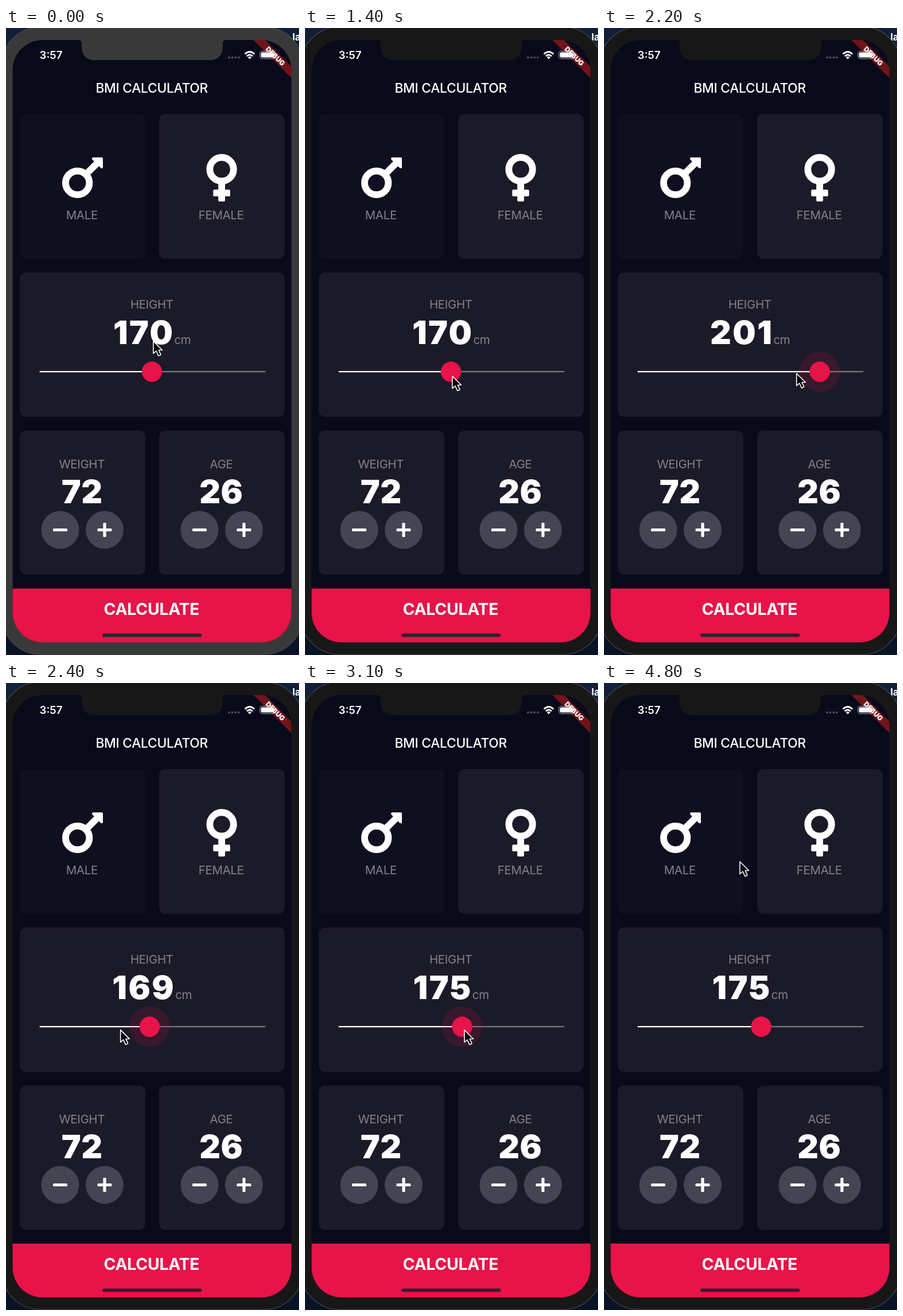
An HTML page that plays this animation: 511x1095 px, repeating every 5000 ms.

```html
<!DOCTYPE html>
<html lang="en">
<head>
<meta charset="utf-8">
<title>BMI Calculator</title>
<style>
  html, body { margin: 0; width: 100%; height: 100%; overflow: hidden; background: #0c172b; }
  svg { display: block; width: 100%; height: 100%; font-family: Inter, Roboto, sans-serif; }
  text { fill: #fff; text-anchor: middle; }
  .label { font-size: 20.5px; letter-spacing: -.35px; fill: #82828d; }
  .number { font-size: 57px; font-weight: 900; letter-spacing: .6px; }
  #height { letter-spacing: 2.4px; }
  .card { fill: #1b1a28; }
  .card.off { fill: #0f0f20; }
  .bezel { fill: #181717; }
  .blurred .bezel { fill: #3a393a; }
  .round { fill: #444553; }
  .red { fill: #e81349; }
  .icon { fill: #fff; }
  .icon circle { fill: none; stroke: #fff; stroke-width: 64; }
</style>
</head>
<body>
<svg id="stage" viewBox="0 0 511 1095" preserveAspectRatio="none">
  <defs>
    <clipPath id="screen"><rect x="11.6" y="21" width="486.2" height="1052" rx="52"/></clipPath>
    <linearGradient id="desk" x2="0" y2="1">
      <stop stop-color="#111f38"/><stop offset="1" stop-color="#091326"/>
    </linearGradient>
    <g id="minus">
      <circle class="round" r="33"/>
      <rect x="-12.5" y="-2.6" width="25" height="5.2" rx="1.6" fill="#fff"/>
    </g>
    <g id="plus">
      <use href="#minus"/>
      <rect x="-2.6" y="-12.5" width="5.2" height="25" rx="1.6" fill="#fff"/>
    </g>
  </defs>

  <rect width="511" height="1095" fill="url(#desk)"/>
  <text x="499.5" y="21.5" font-size="17" font-weight="700" style="text-anchor:start">la</text>
  <rect class="bezel" x="-8" y="-2" width="526" height="1096" rx="68" stroke="#47494e" stroke-width="1.2"/>

  <g clip-path="url(#screen)">
    <rect x="11" y="21" width="488" height="1052" fill="#080a1a"/>
    <text x="254.2" y="113.3" font-size="22.8" font-weight="500" letter-spacing="-.3">BMI CALCULATOR</text>

    <rect id="male" class="card" x="24" y="150" width="219" height="253" rx="11.5"/>
    <rect id="female" class="card" x="267" y="150" width="219" height="253" rx="11.5"/>
    <rect class="card" x="24" y="427" width="462" height="252" rx="11.5"/>
    <rect class="card" x="24" y="703" width="219" height="252" rx="11.5"/>
    <rect class="card" x="267" y="703" width="219" height="252" rx="11.5"/>

    <g class="icon" transform="translate(98 214.2) scale(.185)">
      <circle cx="144" cy="304" r="112"/>
      <path d="M372 64h-79c-10.7 0-16 12.9-8.5 20.4l16.9 16.9-91 91 45.2 45.3 91-91 16.9 16.9c7.6 7.6 20.4 2.2 20.4-8.5V76q0-12-12-12z"/>
    </g>
    <g class="icon" transform="translate(349.5 214.2) scale(.185)">
      <circle cx="144" cy="176" r="112"/>
      <path d="M112 300v68H76q-12 0-12 12v40q0 12 12 12h36v36q0 12 12 12h40q12 0 12-12v-36h36q12 0 12-12v-40q0-12-12-12h-36v-68z"/>
    </g>
    <text class="label" x="132.3" y="334">MALE</text>
    <text class="label" x="375.3" y="334">FEMALE</text>

    <text class="label" x="254.3" y="490">HEIGHT</text>
    <text x="254.7" y="551.7"><tspan id="height" class="number">170</tspan><tspan class="label">cm</tspan></text>
    <rect x="58.5" y="598.9" width="394" height="2.4" rx="1.2" fill="#777781"/>
    <rect id="filled" x="58.5" y="598.9" width="196" height="2.4" rx="1.2" fill="#fff"/>
    <g id="thumb">
      <circle id="halo" class="red" r="35.2"/>
      <circle class="red" r="17.7"/>
    </g>

    <text class="label" x="132.3" y="769">WEIGHT</text>
    <text class="number" x="132.7" y="830">72</text>
    <use href="#minus" x="94.5" y="876.5"/>
    <use href="#plus" x="172" y="876.5"/>
    <text class="label" x="375.6" y="769">AGE</text>
    <text class="number" x="375.4" y="830">26</text>
    <use href="#minus" x="337.5" y="876.5"/>
    <use href="#plus" x="415" y="876.5"/>

    <rect class="red" x="11" y="979" width="488" height="94"/>
    <text x="253.8" y="1025" font-size="28.4" font-weight="700" letter-spacing="-.3">CALCULATE</text>
    <rect x="168" y="1057.4" width="173.5" height="6" rx="3" fill="#33202c"/>

    <g transform="translate(498 21) rotate(45)">
      <rect x="-47" y="32.9" width="94" height="14.1" fill="#b71c1c" fill-opacity=".6"/>
      <text y="44.2" font-size="12" font-weight="900">DEBUG</text>
    </g>

    <text x="78.5" y="54" font-size="18.6" font-weight="600">3:57</text>
    <path d="M389 51.5h18" fill="none" stroke="#4b4d57" stroke-width="4" stroke-linecap="round" stroke-dasharray="0 5.7"/>
    <g fill="none" stroke="#fff" stroke-width="2.7">
      <path d="M416.7 45.6Q425 37.4 433.3 45.6"/>
      <path d="M420 49.2Q425 44.2 430 49.2"/>
    </g>
    <path d="M421.8 51.2Q425 48.2 428.2 51.2L425 54.4Z" fill="#fff"/>
    <rect x="442.6" y="40.6" width="27" height="13" rx="4" fill="none" stroke="#fff" stroke-opacity=".5" stroke-width="1.2"/>
    <rect x="444.6" y="42.6" width="23" height="9" rx="2.3" fill="#fff"/>
    <path d="M471 45v4.5q2-2.2 0-4.5" fill="#fff" fill-opacity=".5"/>
  </g>
  <path class="bezel" d="M124 20q8 0 8 8v4q0 24 24 24h198q24 0 24-24v-4q0-8 8-8z"/>

  <path id="cursor" d="M0 0V21.5L5 17L8.8 25.5L13 23.7L9.3 15.5H15.5Z" fill="#000" stroke="#fff" stroke-width="1.6" stroke-linejoin="round"/>
</svg>

<script>
const LOOP = 5000, STEP = 100;
const LAG = 80, PX_PER_CM = 3.93;
const FOCUS = 1300, GRAB = 1400, DROP = 3200, PICK_MALE = 3800, PICK_FEMALE = 4300;

// Pointer gestures: each eases to a spot, then rests until the next begins
const home = { x: 257, y: 547 };
const moves = [
  { from: 0, to: 1300, x: 257, y: 608 },
  { from: 1435, to: 1985, x: 398, y: 602 },
  { from: 2018, to: 2568, x: 146, y: 607 },
  { from: 2568, to: 3000, x: 278, y: 606 },
  { from: DROP, to: 3600, x: 182, y: 289 },
  { from: PICK_MALE, to: 4100, x: 218, y: 287 },
  { from: 4100, to: PICK_FEMALE, x: 388, y: 234 },
  { from: 4400, to: 4600, x: 157, y: 300 },
  { from: 4600, to: 4800, x: 237, y: 312 }
];

const $ = id => document.getElementById(id);
const clamp = (v, lo, hi) => Math.min(Math.max(v, lo), hi);
const ramp = (t, from, to) => clamp((t - from) / (to - from), 0, 1);
const ease = p => (1 - Math.cos(Math.PI * p)) / 2;

function pointer(t) {
  let { x, y } = home;
  for (const m of moves) {
    const p = ease(ramp(t, m.from, m.to));
    x += (m.x - x) * p;
    y += (m.y - y) * p;
  }
  return { x, y };
}

function draw(t) {
  const tip = pointer(t);
  const drag = pointer(clamp(t - LAG, GRAB, DROP)).x - home.x;
  const cm = 170 + Math.round(drag / PX_PER_CM);
  const x = 254.5 + (cm - 170) * PX_PER_CM;
  $('height').textContent = cm;
  $('filled').setAttribute('width', x - 58.5);
  $('thumb').setAttribute('transform', `translate(${x} 600.3)`);
  $('halo').setAttribute('opacity', .14 * (ramp(t, GRAB, GRAB + 200) - ramp(t, DROP, DROP + 300)));
  $('cursor').setAttribute('transform', `translate(${tip.x} ${tip.y})`);

  const male = t >= PICK_MALE && t < PICK_FEMALE;
  $('male').classList.toggle('off', !male);
  $('female').classList.toggle('off', male);
  $('stage').classList.toggle('blurred', t < FOCUS);
}

let start;
function tick(now) {
  start ??= now;
  draw(Math.floor((now - start) % LOOP / STEP) * STEP);
  requestAnimationFrame(tick);
}
draw(0);
requestAnimationFrame(tick);
</script>
</body>
</html>
```
